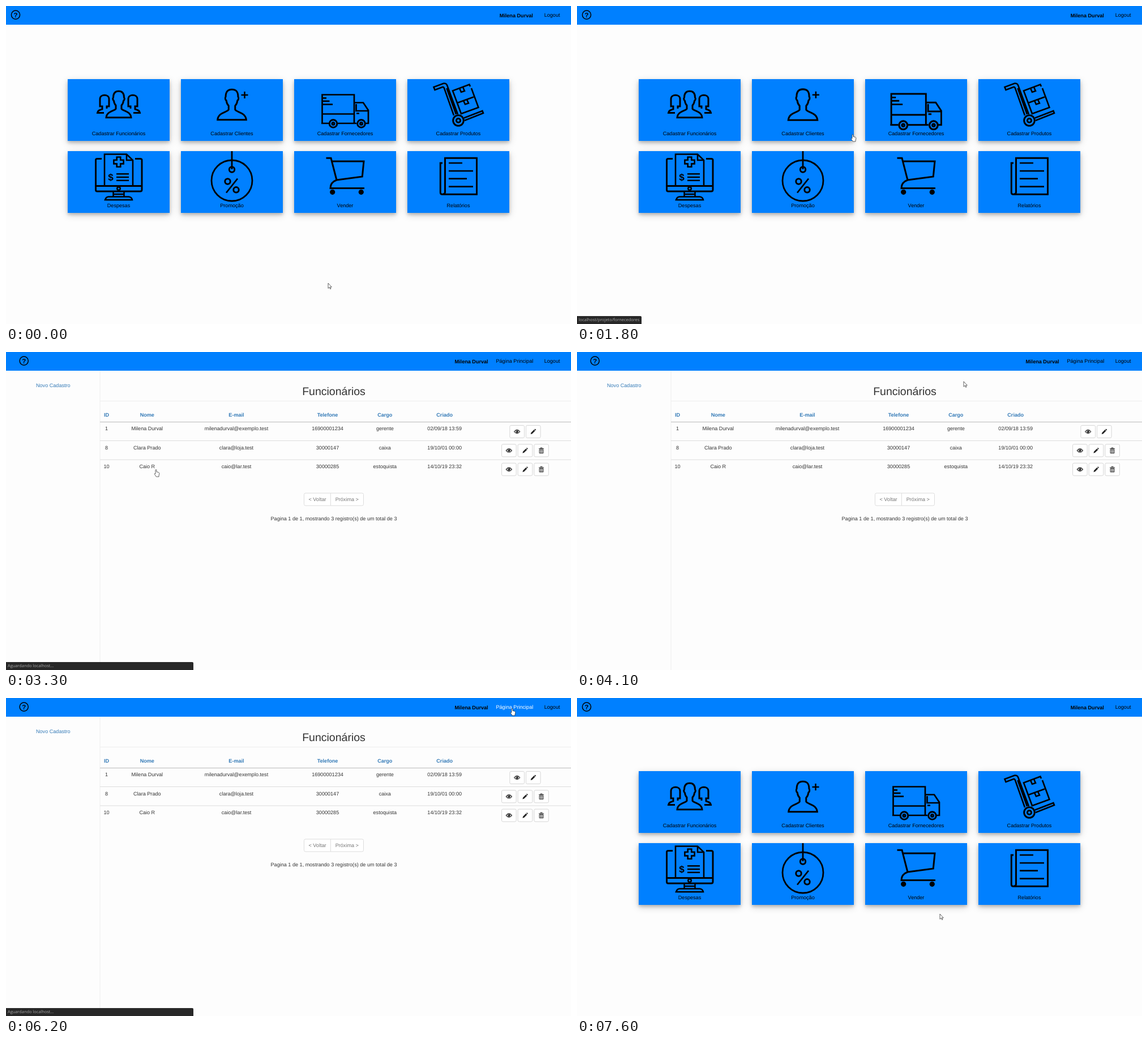
These frames come from a looping animation (998x561 px, 8.5 s). An HTML page:

```html
<!DOCTYPE html>
<html lang="pt-BR">
<head>
<meta charset="utf-8">
<style>
  html, body { margin: 0; width: 100%; height: 100%; overflow: hidden; background: #fdfdfd; }
  svg { position: absolute; left: 0; top: 0; }
  text { font: 9.1px "Liberation Sans", Arial, sans-serif; text-rendering: geometricPrecision; }
  .mid { text-anchor: middle; }
  .bold { font-weight: bold; }
  .card { position: absolute; width: 179.5px; height: 109.5px; background: #0080ff;
    box-shadow: 0 2.6px 5.2px rgba(0,0,0,.2), 0 3.9px 13px rgba(0,0,0,.19); }
  .icon { fill: none; stroke: #000; stroke-width: 3; }
  .solid { fill: #000; stroke: none; }
  #list text { fill: #333; }
  #list .link { fill: #337ab7; }
  .button { fill: #fff; stroke: #ccc; stroke-width: .8; }
  #status { position: absolute; left: 0; bottom: 0; height: 14px; box-sizing: border-box; padding: 0 4px 0 3px;
    font: 7.4px/14px "Open Sans", sans-serif; white-space: nowrap; color: #a8a8a8; background: #282828;
    border-top-right-radius: 2px; text-rendering: geometricPrecision; }
</style>
</head>
<body>
<div id="cards"></div>
<svg width="998" height="561" viewBox="0 0 998 561">
  <defs>
    <path id="person" d="M0 0C-7 0-9.5 4-9.5 11C-11 13-10 16-8.5 17C-8 22-6 24-5 25V31C-7 35-21 35-22 46.5H22C21 35 7 35 5 31V25C6 24 8 22 8.5 17C10 16 11 13 9.5 11C9.5 4 7 0 0 0Z"/>
    <path id="woman" d="M173 188.5H161.5C162 184 166 183.5 170 182V177H166V164C166 155 182 155 182 164V177H178V181"/>
    <g id="eye"><path d="M-5 0Q0-6.4 5 0Q0 6.4-5 0Z" fill="none" stroke="#222" stroke-width="1.2"/><circle r="2.3" fill="#222"/><circle cx="-.7" cy="-.8" r=".6" fill="#fff"/></g>
    <path id="pencil" fill="#222" d="M-4.6 4.6L-3.8 1.8L1.4-3.4L3.4-1.4L-1.8 3.8ZM2-4L2.8-4.7Q3.4-5 4-4.4L4.6-3.8Q5-3.2 4.6-2.7L4-2Z"/>
    <path id="trash" fill="none" stroke="#222" d="M-4.5-3.2H4.5M-1.5-3.4V-4.8H1.5V-3.4M-3.4-1.6V4.6H3.4V-1.6ZM-1.2-1V4M1.2-1V4"/>
  </defs>
  <g id="list">
    <path d="M166 33V561M166 86.5H998" stroke="#eee"/>
    <path d="M166 123.5H998" stroke="#ccc" stroke-width="1.3"/>
    <path d="M166 156.5H998M166 190H998" stroke="#ddd"/>
    <text class="mid link" x="83.3" y="61.7">Novo Cadastro</text>
    <text class="mid" x="579" y="75.5" style="font-size:19.5px">Funcionários</text>
    <g id="rows"></g>
    <rect x="526.5" y="249" width="105" height="22" rx="2.6" fill="#fff" stroke="#ddd"/>
    <path d="M573.5 249V271" stroke="#ddd"/>
    <text class="mid" x="550" y="263" style="fill:#777">&lt; Voltar</text>
    <text class="mid" x="602.3" y="263" style="fill:#777">Próxima &gt;</text>
    <text class="mid" x="579" y="297">Pagina 1 de 1, mostrando 3 registro(s) de um total de 3</text>
  </g>
  <rect width="998" height="33" fill="#0080ff"/>
  <g id="help">
    <circle r="7.6" cy="15.6" fill="none" stroke="#000" stroke-width="1.5"/>
    <text class="mid bold" y="19.8" style="font-size:11.5px">?</text>
  </g>
  <text id="user" class="bold" y="20">Milena Durval</text>
  <text id="main" x="865.5" y="19.3">Página Principal</text>
  <text x="950.7" y="19.3">Logout</text>
  <g id="home"></g>
</svg>
<div id="status"></div>
<svg width="998" height="561" viewBox="0 0 998 561">
  <g id="cursor" fill="#fff" stroke="#222" stroke-width=".7" stroke-linejoin="round">
    <path id="arrow" d="M0 0V9.2L2.2 7.2L3.7 10.3L5 9.7L3.6 6.8H6.3Z"/>
    <path id="hand" d="M-1 7V1.2Q0-.4 1 1.2V4.5L4.8 5.4Q6 6 5.8 8L5 11.2V13H.3L-2.7 8.4Q-2.6 6.6-1 7.8Z"/>
    <path id="beam" d="M-1.5-4H1.5M0-4V4M-1.5 4H1.5" stroke="#dde8f5" stroke-width=".9"/>
  </g>
</svg>
<script>
const $ = id => document.getElementById(id);
const LOOP = 8500, STEP = 100;

// label, address, icon
const cards = [
  ['Cadastrar Funcionários', 'funcionarios',
    `<use href="#woman"/><use href="#woman" transform="matrix(-1 0 0 1 398 0)"/>
     <use href="#person" x="199" y="150.3"/>`],
  ['Cadastrar Clientes', 'clientes',
    `<use href="#person" transform="translate(399 147.3) scale(1.15)" stroke-width="2.6"/>
     <path d="M415.5 157H427.5M421.5 151V163" stroke-width="2.5"/>`],
  ['Cadastrar Fornecedores', 'fornecedores',
    `<path d="M558.5 208V156.5H615V207M558.5 190.5H615M558.5 162.3H566M558.5 167.8H571.5M558.5 173.6H577" stroke-width="2.7"/>
     <path d="M557 207H570M586 207H619M635 207H640V184L631 170.5H616M618.5 173V185H639M619 189.5H624" stroke-width="2.7"/>
     <circle cx="578" cy="207.5" r="6.8"/><circle cx="578" cy="207.5" r="2"/>
     <circle cx="627.5" cy="207.5" r="6.8"/><circle cx="627.5" cy="207.5" r="2"/>`],
  ['Cadastrar Produtos', 'produtos',
    `<path d="M791 193L774 145Q773 142.5 771 143L757.5 148L755.5 143L773 136.5Q777.5 136 779 139.5L798 191M778.5 145L795 191" stroke-width="2.6"/>
     <path d="M820 142L818.5 138.5L789 149.5L804 190L834.5 179L822 145M797 171L826 160.5M801 145L804 152L810 150L807 143M808 167L811 173.5L817 171.5L814 165" stroke-width="2.6"/>
     <path d="M809 197.5L841.5 185L843 189L810 202" stroke-width="2.6"/>
     <circle cx="799" cy="202" r="9.3"/><circle cx="799" cy="202" r="3.6"/>`],
  ['Despesas', 'despesas',
    `<path d="M169 269.5H161Q158.5 269.5 158.5 272V324Q158.5 327 161 327H237Q240 327 240 324V272Q240 269.5 237 269.5H228M158.5 317.5H240"/>
     <path d="M174 317V261.5H213L224 272V317M213 261.5V272H224M195 296.3H217M195 302H217M195 307.7H217" stroke-width="2.6"/>
     <path d="M195.7 266.5h6.6v5.3h5.3v6.6h-5.3v5.3h-6.6v-5.3h-5.3v-6.6h5.3z" stroke-width="2.6"/>
     <circle cx="199" cy="322" r="2.8" stroke-width="2.4"/>
     <path d="M189.5 328V336M208.5 328V336M189.5 332H208.5M175 342Q177 336.5 181 336.5H217Q222 337 223 342Z" stroke-width="2.5"/>
     <text class="solid mid bold" x="185" y="308" style="font-size:17px">$</text>`],
  ['Promoção', 'promocao',
    `<path d="M399 256V288M389 329.5L409 304.5" stroke-width="2.8"/>
     <circle cx="399" cy="308" r="36" stroke-width="2.8"/><circle cx="399" cy="288.5" r="4.7"/>
     <circle cx="391.5" cy="309.5" r="4.7"/><circle cx="406.5" cy="324.3" r="4.7"/>`],
  ['Vender', 'vender',
    `<path d="M565.5 268.3H574L584 307M576 274H632L629.3 301L584 307Q573 311 573 321.5H633"/>
     <circle class="solid" cx="576.7" cy="328.3" r="4.6"/><circle class="solid" cx="627.3" cy="328.3" r="4.6"/>`],
  ['Relatórios', 'relatorios',
    `<path d="M771 277H767.3V329Q767.3 332.3 770.5 332.3H831.5V268.3H775.5V329Q775 332 771.5 332"/>
     <path d="M782 277H806M782 291H825M782 304.6H814M782 318.6H825" stroke-width="2.6"/>`]
].map(([label, slug, art], i) => ({ label, slug, art, x: 109 + 200 * (i % 4), y: i < 4 ? 128.5 : 255.5 }));

for (const c of cards) {
  const cx = c.x + 90;
  $('cards').innerHTML += `<div class="card" style="left:${c.x}px;top:${c.y}px"></div>`;
  $('home').innerHTML += `<g class="icon">${c.art}</g><text class="mid" x="${cx}" y="${c.y + 99}">${c.label}</text>`;
}
const icons = document.querySelectorAll('.icon');

const columns = [177.5, 249.3, 407, 568, 669.3, 774.7];
const cells = (values, y, look) => values.map((v, i) => `<text class="mid ${look}" x="${columns[i]}" y="${y}">${v}</text>`).join('');
const tools = (names, y) => names.map((name, i) => {
  const x = 917 + (i - (names.length - 1) / 2) * 28.6;
  return `<rect class="button" x="${x - 12.8}" y="${y - 11}" width="25.6" height="22" rx="2.2"/><use href="#${name}" x="${x}" y="${y}"/>`;
}).join('');
$('rows').innerHTML = cells(['ID', 'Nome', 'E-mail', 'Telefone', 'Cargo', 'Criado'], 114, 'bold link') + [
  ['1', 'Milena Durval', 'milenadurval@exemplo.test', '16900001234', 'gerente', '02/09/18 13:59'],
  ['8', 'Clara Prado', 'clara@loja.test', '30000147', 'caixa', '19/10/01 00:00'],
  ['10', 'Caio R', 'caio@lar.test', '30000285', 'estoquista', '14/10/19 23:32']
].map((row, i) => cells(row, 138.2 + 33.3 * i, '') +
  tools(i ? ['eye', 'pencil', 'trash'] : ['eye', 'pencil'], 140.5 + 33.3 * i)).join('');

// pointer: time, x, y
const path = [
  [1000, 569, 489], [1100, 640, 440], [1200, 800, 320], [1300, 872, 205], [1400, 740, 185],
  [1500, 660, 190], [1600, 590, 200], [1700, 540, 214], [1800, 487, 226], [1900, 400, 226],
  [2100, 290, 214], [2300, 265, 207], [3500, 265, 207], [3600, 350, 180], [3700, 500, 125],
  [3900, 713, 55], [4000, 713, 55], [4100, 683, 52], [4200, 866, 55], [4300, 866, 55],
  [4400, 720, 90], [4600, 413, 157], [4800, 680, 75], [4900, 840, 28], [5000, 905, 15],
  [5200, 898, 18], [5600, 894, 18], [6400, 894, 18], [6500, 895, 20], [6800, 895, 20],
  [6900, 875, 50], [7100, 745, 250], [7300, 655, 372], [7600, 641, 381]
];
function pointer(t) {
  const i = path.findIndex(p => p[0] > t);
  if (i < 1) return path[i ? path.length - 1 : 0].slice(1);
  const [a, b] = [path[i - 1], path[i]], k = (t - a[0]) / (b[0] - a[0]);
  return [a[1] + (b[1] - a[1]) * k, a[2] + (b[2] - a[2]) * k];
}
const onList = t => t >= 3300 && t < 6500;
function hovered(t) {
  if (onList(t)) return -1;
  const [x, y] = pointer(t);
  return cards.findIndex(c => x > c.x && x < c.x + 179.5 && y > c.y && y < c.y + 109.5);
}
function statusText(t) {
  if (t >= 3000 && t < 3600 || t >= 6200 && t < 6900) return 'Aguardando localhost...';
  if (t >= 5300 && t < 6200) return 'localhost/projeto/home';
  const i = hovered(t - 100);
  return i < 0 ? '' : 'localhost/projeto/' + cards[i].slug;
}
const show = (id, on) => $(id).style.display = on ? '' : 'none';

function draw(t) {
  const list = onList(t), [x, y] = pointer(t);
  show('list', list);
  show('main', list);
  show('home', !list);
  show('cards', !list);
  $('help').setAttribute('transform', `translate(${list ? 31.7 : 17} 0)`);
  $('user').setAttribute('x', list ? 792.5 : 871.7);

  const link = list && x > 865 && x < 931 && y > 8 && y < 30;
  $('main').style.fill = link ? '#fff' : '#000';

  // icons grow over 300 ms of hovering
  const recent = [0, 1, 2, 3, 4, 5].map(k => hovered(t - 50 * k));
  icons.forEach((icon, i) => {
    const s = 1 + recent.filter(h => h === i).length / 60;
    const cx = cards[i].x + 90, cy = cards[i].y + 45;
    icon.setAttribute('transform', `translate(${cx} ${cy}) scale(${s}) translate(${-cx} ${-cy})`);
  });

  const message = statusText(t);
  show('status', message);
  $('status').textContent = message;
  $('status').style.width = message[0] === 'A' ? '331px' : '';

  const beam = t >= 6500 && t < 6900;
  const hand = !beam && (link || recent[0] >= 0 || t >= 3300 && t < 3600);
  show('beam', beam);
  show('hand', hand);
  show('arrow', !beam && !hand);
  $('cursor').setAttribute('transform', `translate(${x} ${y})`);
}

const start = performance.now();
function tick() {
  const t = (performance.now() - start) % LOOP;
  draw(Math.floor(t / STEP) * STEP);
  requestAnimationFrame(tick);
}
tick();
</script>
</body>
</html>
```
